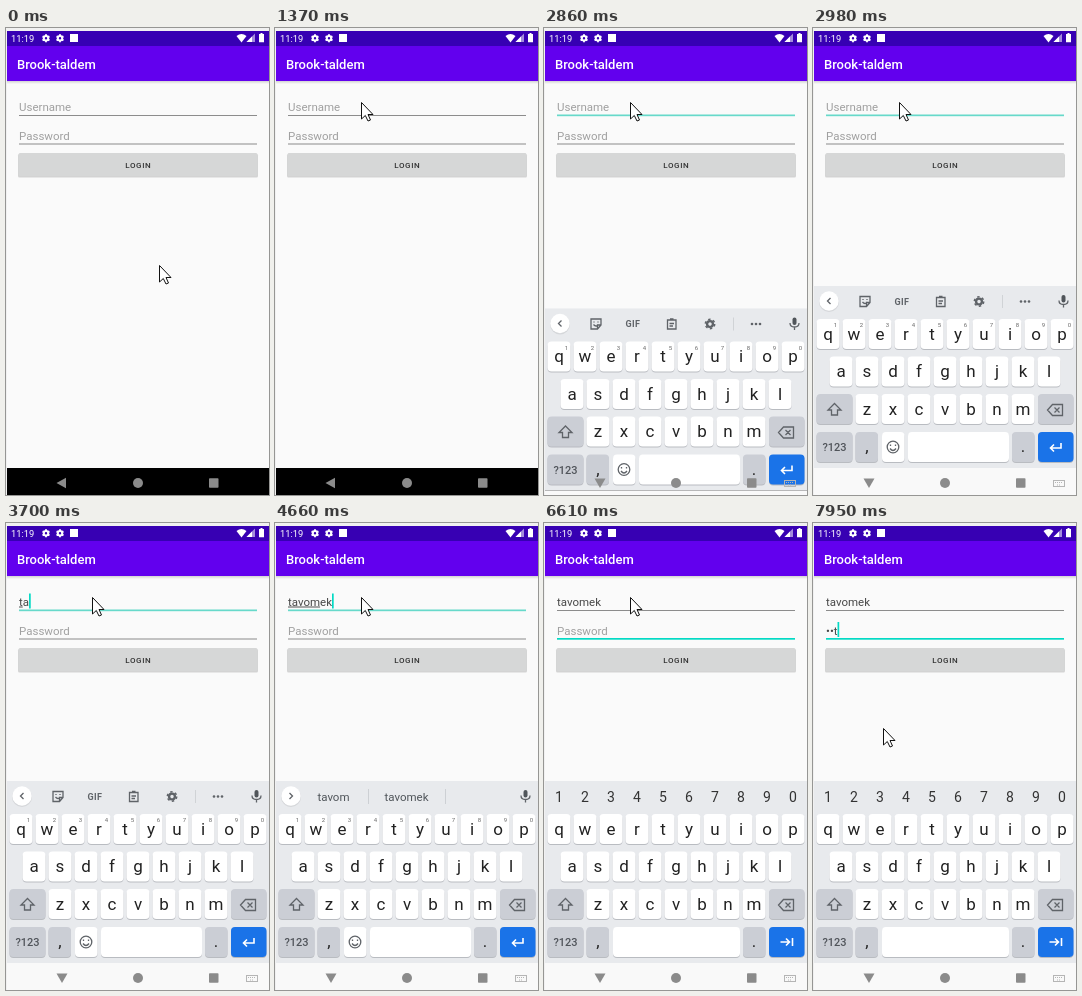
Recreate the animation shown at these times as an HTML page. Size 263 px wide and 467 px high, loop 8 s.

```html
<!DOCTYPE html>
<html lang="en">
<head>
<meta charset="utf-8">
<title>Login form</title>
<style>
  html, body { margin: 0; width: 100%; height: 100%; overflow: hidden; background: #f1f1f1; }
  svg { display: block; width: 100vw; height: 100vh; font-family: Roboto, sans-serif; }
  .field { font-size: 11.5px; fill: #484848; }
  .hint { font-size: 11.5px; fill: #a0a0a0; }
  .letter { font-size: 17px; fill: #222; text-anchor: middle; }
  .sup { font-size: 6px; fill: #666; text-anchor: middle; }
  .digit { font-size: 14px; fill: #333; text-anchor: middle; }
  .chip { font-size: 11.5px; fill: #50555a; text-anchor: middle; }
  .line { fill: none; stroke: #5f6368; stroke-width: 1.3; }
</style>
</head>
<body>
<svg viewBox="0 0 263 467" preserveAspectRatio="none">
  <defs>
    <path id="gear" fill="none" stroke="#fff" stroke-width="2" d="M-2.2 0A2.2 2.2 0 1 0 2.2 0A2.2 2.2 0 1 0-2.2 0M0-4V-2.5M0 4V2.5M-3.5-2L-2.1-1.2M3.5 2L2.1 1.2M-3.5 2L-2.1 1.2M3.5-2L2.1-1.2"/>
    <linearGradient id="drop" x2="0" y2="1"><stop stop-color="#d2d2d2"/><stop offset="1" stop-color="#fafafa"/></linearGradient>
  </defs>

  <rect x="1" y="3" width="262" height="464" fill="#fafafa"/>
  <rect x="1" y="3" width="262" height="15" fill="#3700b3"/>
  <rect x="1" y="18" width="262" height="35" fill="#6200ee"/>
  <rect x="1" y="53" width="262" height="3" fill="url(#drop)"/>
  <g fill="#fff">
    <text x="5" y="14" font-size="9.3">11:19</text>
    <use href="#gear" x="40" y="10.3"/>
    <use href="#gear" x="54" y="10.3"/>
    <rect x="64" y="6" width="8" height="8"/>
    <path d="M230.5 8Q235.500 4 240.500 8L235.500 14.500Z"/>
    <path d="M249 5.500V14H240.500Z" opacity=".55"/>
    <path d="M246 8.500V14H240.500Z"/>
    <path d="M254.500 5H256.500V6H258V14.300H253V6H254.500Z"/>
    <text x="11" y="41" font-size="13" font-weight="500">Brook-taldem</text>
  </g>

  <g id="user"></g>
  <g id="pass"></g>

  <rect x="12" y="126" width="240" height="23.500" rx="1.500" fill="#c4c4c4" opacity=".7"/>
  <rect x="12.500" y="125" width="239" height="23" rx="1.500" fill="#d6d7d7"/>
  <text x="132.300" y="139.800" font-size="8" font-weight="500" letter-spacing=".6" text-anchor="middle" fill="#333">LOGIN</text>

  <rect id="navBar" x="1" y="440" width="262" height="27"/>
  <g id="keyboard"></g>
  <g id="navIcons" fill="#8b8b8b">
    <path id="back" d="M50.500 455L60 449.800V460.200Z"/>
    <path id="down" d="M50.500 450.500H61.500L56 460Z"/>
    <circle cx="132" cy="455" r="5"/>
    <rect x="203" y="450.300" width="9.500" height="9.500" rx=".8"/>
    <g id="switcher" fill="none" stroke="#b5b5b5">
      <rect x="240.500" y="452.500" width="11" height="6"/>
      <path d="M242 454.500H250M244 457H248" stroke-dasharray="1 1"/>
    </g>
  </g>
  <path id="cursor" d="M.5.5V17L4.300 13.500L7 19L9.500 18L7 12.500H12Z" fill="#fff" stroke="#111" stroke-linejoin="round"/>
</svg>

<script>
const LOOP = 8000, TEAL = '#03dac5';
const $ = id => document.getElementById(id);
const show = (node, on) => node.style.display = on ? '' : 'none';
const at = (track, t) => track.reduce((value, step) => t >= step[0] ? step[1] : value, track[0][1]);

// Each track is a list of [start time, value] held until the next entry.
const cursorTrack = [[0, [153, 237]], [830, [128, 172]], [970, [113, 110]], [1100, [101, 76]], [1250, [92, 71]],
  [1370, [86, 74]], [6730, [86, 120]], [6880, [77, 178]], [7000, [70, 205]]];
const focusTrack = [[0, ''], [2160, 'user'], [5940, 'pass']];
const caretTrack = [[0, 0], [2420, 1], [2860, 0], [3410, 1], [5530, 0], [6180, 1], [6610, 0], [7150, 1]];
const name = 'tavomek';
const typedTrack = [[0, 0], [3560, 1], [3700, 2], [3850, 3], [4120, 4], [4420, 5], [4540, 6], [4660, 7]];
const underlineTrack = [[0, 0], [3700, 1], [3850, 2], [4120, 3], [4270, 4], [4540, 5], [4810, 7], [5940, 0]];
const passTrack = [[0, ''], [7430, 's'], [7830, '•a'], [7950, '••t']];
const slideTrack = [[0, null], [2860, 22.5], [2980, 0]];
const chipTrack = [[0, null], [3850, ['tab', 'take', 'table']], [4120, ['tavo', 'tavern', 'taken']],
  [4420, ['tavo', 'tavern', '']], [4540, ['tavom', 'tavern', '']], [4660, ['tavom', name, '']],
  [4930, ['tavome', name, '']], [5080, [name, 'tavome', '']]];

function makeField(id, hint, baseline) {
  $(id).innerHTML = `<text class="hint" x="13" y="${baseline}">${hint}</text>
    <text class="field" x="13" y="${baseline}"></text>
    <rect class="rule" x="13" width="238"/>
    <rect class="composing" x="13" y="${baseline + .5}" height="1" fill="#555"/>
    <rect class="caret" y="${baseline - 12.5}" width="1.700" height="15" fill="${TEAL}"/>`;
  const [hintText, text, rule, composing, caret] = $(id).children;
  return (value, focused, caretOn, composed) => {
    text.textContent = value;
    show(hintText, !value);
    rule.setAttribute('y', baseline + (focused ? 3.5 : 4));
    rule.setAttribute('height', focused ? 1.7 : 1);
    rule.setAttribute('fill', focused ? (id === 'user' ? '#67d9ca' : TEAL) : '#8c8c8c');
    const width = value ? text.getComputedTextLength() : 0;
    caret.setAttribute('x', 13 + width);
    show(caret, focused && caretOn);
    composing.setAttribute('width', composed ? text.getSubStringLength(0, composed) : 0);
  };
}

const key = (x, y, w, fill = '#fff') =>
  `<rect x="${x}" y="${y + 1}" width="${w}" height="30" rx="4" fill="#b9bcc1"/>
   <rect x="${x}" y="${y}" width="${w}" height="30" rx="4" fill="${fill}"/>`;
const keyRow = (letters, firstX, y) => [...letters].map((c, i) => {
  const x = firstX + 26 * i;
  return key(x - 11.5, y, 23) + `<text class="letter" x="${x}" y="${y + 20.5}">${c}</text>`;
}).join('');
const row = (cls, chars, x, y) => [...chars].map((c, i) =>
  `<text class="${cls}" x="${x + 26 * i}" y="${y}">${c}</text>`).join('');

function makeKeyboard() {
  const grey = '#cbced5';
  $('keyboard').innerHTML = `
    <rect x="1" y="258" width="262" height="182" fill="#e8eaed"/>
    <rect x="1" y="440" width="262" height="27" fill="#f9f9f9"/>
    ${keyRow('qwertyuiop', 15, 291)}${keyRow('asdfghjkl', 28, 328.5)}${keyRow('zxcvbnm', 54, 366)}
    ${key(3.5, 366, 36, grey)}${key(225, 366, 35.5, grey)}
    ${key(3.5, 404, 36, grey)}${key(42.5, 404, 22.5, grey)}${key(199, 404, 22.500, grey)}
    ${key(225, 404, 35.5, '#1a73e8')}
    <path class="line" d="M21.500 375.500L28 382H24.500V387H18.500V382H15Z"/>
    <path class="line" d="M239.500 376.500H249.500V387.500H239.500L234.500 382ZM241.500 379.500L246.500 384.500M246.500 379.500L241.500 384.500"/>
    <text x="21.500" y="423" font-size="11" font-weight="500" fill="#50545a" text-anchor="middle">?123</text>
    <text class="letter" x="54" y="424" font-size="14">,</text>
    <text class="letter" x="210" y="424" font-size="14">.</text>
    <g id="textKeys">
      ${key(69, 404, 22.5)}${key(95, 404, 101)}
      <circle class="line" cx="80" cy="419" r="5.800"/>
      <path class="line" d="M77 420.500Q80 424.500 83 420.500M77.500 416.500V418M82.500 416.500V418"/>
      ${row('sup', '1234567890', 22.5, 299)}
      <path class="line" style="stroke:#fff;stroke-width:1.600" d="M248 415V420H237.500M241 416.500L237.500 420L241 423.500"/>
      <circle cx="16" cy="274" r="10" fill="#d5d7da"/><circle cx="16" cy="273" r="9.700" fill="#fff"/>
      <path id="arrow" class="line"/>
      <rect x="248.500" y="267" width="4" height="7.500" rx="2" fill="#50555a"/>
      <path class="line" d="M246 272.500Q246 276.500 250.500 276.500T255 272.500M250.500 276.500V279.500"/>
      <g id="tools">
        <path class="line" d="M47 268.500H57V274.500L53.500 278.500H47ZM57 274.500H53.500V278.500M49.500 274Q52 277 54.500 274M50 271V272M54 271V272"/>
        <text x="89" y="276.500" font-size="9" font-weight="700" fill="#5f6368" text-anchor="middle" letter-spacing=".4">GIF</text>
        <path class="line" d="M123.500 269.500H132V278.500H123.500ZM126 268.500H129.500M125.500 273H130M125.500 275.500H129"/>
        <use id="toolGear" href="#gear"/>
        <g transform="translate(166 273.500)" stroke="#5f6368" fill="none">
          <circle r="2.900" stroke-width="2.400"/>
          <circle r="4.700" stroke-width="1.500" stroke-dasharray="2.460 2.460"/>
        </g>
        <path d="M189.500 267V280" stroke="#d0d3d6"/>
        <g fill="#5f6368"><circle cx="208" cy="273.500" r="1.300"/><circle cx="212" cy="273.500" r="1.300"/><circle cx="216" cy="273.500" r="1.300"/></g>
      </g>
      <g id="chips">
        <path d="M93.500 266V281M170.500 266V281" stroke="#cdd0d4"/>
        <text class="chip" x="58.500" y="277.500"></text><text class="chip" x="131.500" y="277.500"></text><text class="chip" x="205" y="277.500"></text>
      </g>
    </g>
    <g id="passKeys">
      ${row('digit', '1234567890', 15, 279)}
      ${key(69, 404, 127)}
      <path class="line" style="stroke:#fff;stroke-width:1.600" d="M236.500 419H245M242 415.500L245.500 419L242 422.500M248.500 415V423"/>
    </g>`;
  $('toolGear').remove();
}

const drawUser = makeField('user', 'Username', 83);
const drawPass = makeField('pass', 'Password', 111.5);
makeKeyboard();
const chipTexts = $('chips').querySelectorAll('text');

function render(t) {
  const focus = at(focusTrack, t), caret = at(caretTrack, t);
  drawUser(name.slice(0, at(typedTrack, t)), focus === 'user', caret, at(underlineTrack, t));
  drawPass(at(passTrack, t), focus === 'pass', caret, 0);

  const slide = at(slideTrack, t);
  show($('keyboard'), slide !== null);
  $('keyboard').setAttribute('transform', `translate(0 ${slide || 0})`);
  show($('textKeys'), focus !== 'pass');
  show($('passKeys'), focus === 'pass');

  const chips = at(chipTrack, t);
  show($('tools'), !chips);
  show($('chips'), chips);
  chipTexts.forEach((node, i) => node.textContent = chips ? chips[i] : '');
  $('arrow').setAttribute('d', chips ? 'M14.500 270L17.500 273L14.500 276' : 'M17.500 270L14.500 273L17.500 276');

  show($('switcher'), t >= 2560);
  show($('back'), t < 2710);
  show($('down'), t >= 2710);
  $('cursor').setAttribute('transform', `translate(${at(cursorTrack, t)})`);
}

const start = performance.now();
function tick() {
  render((performance.now() - start) % LOOP);
  requestAnimationFrame(tick);
}
tick();
</script>
</body>
</html>
```
